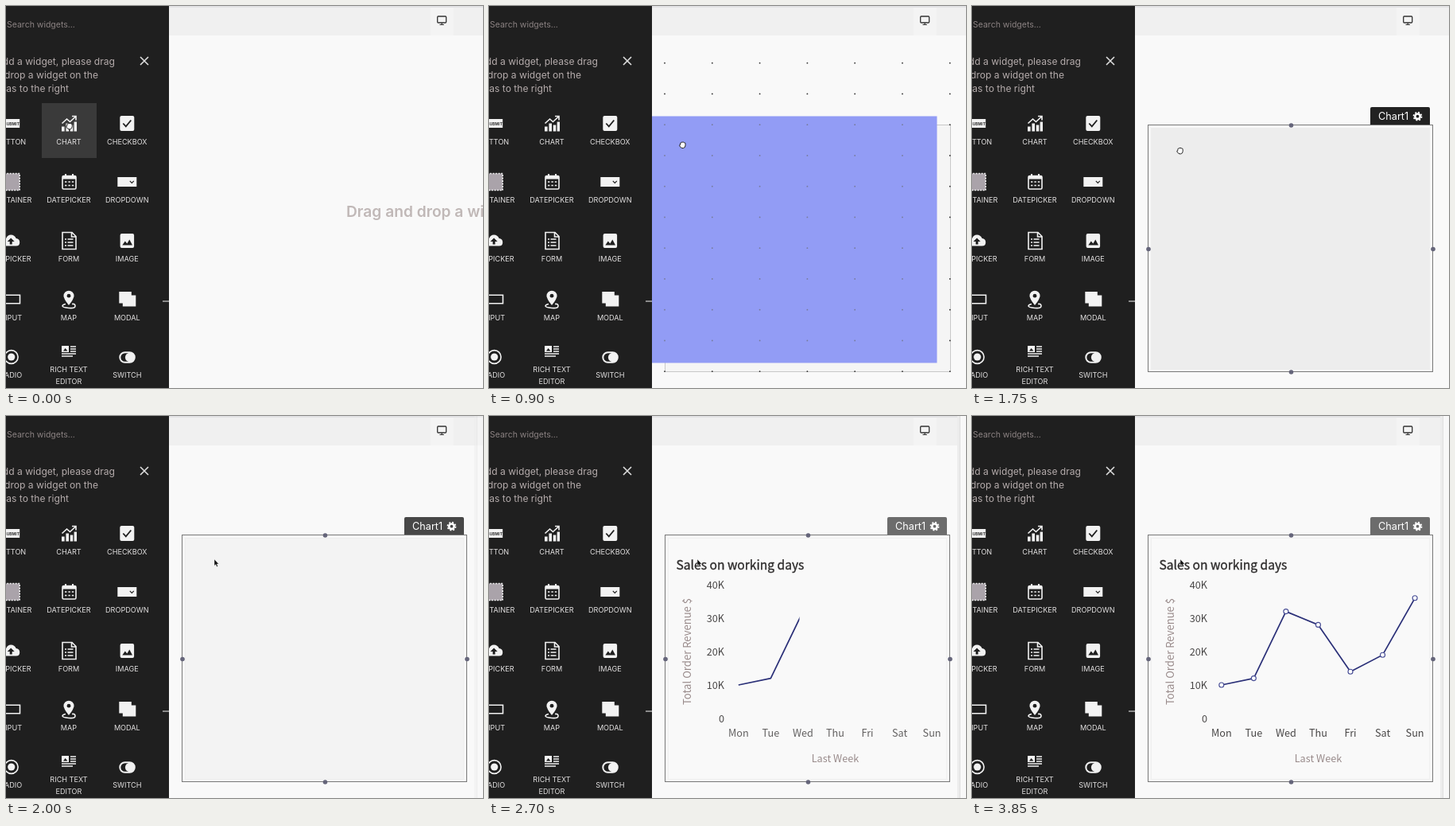
Animation, 600 px wide and 480 px high, one loop 5900 ms. Source, as an HTML page:

```html
<!DOCTYPE html>
<html lang="en">
<head>
<meta charset="utf-8">
<title>Adding a chart widget</title>
<style>
  html, body { margin: 0; width: 100%; height: 100%; overflow: hidden; background: #f9f9f9; }
  svg { display: block; }
  text { font-family: Inter, Roboto, sans-serif; white-space: pre; }
  #chart text { font-family: "Noto Sans CJK JP", "Noto Sans CJK SC", "Noto Sans CJK", "Noto Sans", sans-serif; font-size: 12.7px; fill: #494747; }
  #chart .title { font-size: 15.6px; fill: #2e2c2c; stroke: #2e2c2c; stroke-width: .35; }
  #chart .name { fill: #998b8b; }
  #chart .side { font-size: 13.1px; }
  .mid { text-anchor: middle; }
  .end { text-anchor: end; }
  .label { font-size: 9.1px; fill: #e2e0e0; text-anchor: middle; }
  .hint { font-size: 12.1px; fill: #b4abab; text-anchor: end; }
  .icon { fill: #f2f2f2; stroke: none; }
  .icon .line { fill: none; stroke: #f2f2f2; stroke-width: 1.6; }
  .icon .dark { fill: #1f1f1f; }
  .icon .cut { fill: none; stroke: #1f1f1f; stroke-width: 1.8; }
</style>
</head>
<body>
<svg width="600" height="480" viewBox="0 0 600 480">
  <defs><clipPath id="reveal"><rect id="wipe" x="308" y="200" width="0" height="200"/></clipPath></defs>
  <rect width="600" height="480" fill="#f9f9f9"/>
  <text id="prompt" x="428" y="265" font-size="19.2" font-weight="600" fill="#c0b8b7">Drag and drop a widget here</text>

  <g id="drag">
    <path id="bottom" d="M205 360.5H600" stroke="#bbb" stroke-dasharray="1 1"/>
    <rect id="slot" width="359" height="310" fill="#f5f5f5" stroke="#999" stroke-dasharray="1 1"/>
    <g id="dots" fill="#333"></g>
    <rect id="ghost" width="359" height="310" fill="#929cf5"/>
    <g id="faint" fill="#767b9b"></g>
  </g>

  <g id="widget">
    <rect x="221.5" y="149.5" width="358" height="310" fill="#f9f9f9" stroke="#777"/>
    <rect x="225.5" y="153.5" width="350" height="303" fill="none" stroke="#e6e6e6" stroke-dasharray="1 1"/>
    <rect id="skeleton" x="225" y="153" width="351" height="304" fill="#ededed"/>
    <g id="chart"></g>
    <g fill="#65657a">
      <circle cx="401.5" cy="150" r="2.8"/><circle cx="401.5" cy="460" r="2.8"/>
      <circle cx="222" cy="305.5" r="2.8"/><circle cx="580" cy="305.5" r="2.8"/>
    </g>
    <path id="tag" d="M501 149V129q0-2 2-2h71q2 0 2 2v20z"/>
    <text x="511" y="143.3" font-size="12.7" fill="#fff">Chart1</text>
    <circle cx="560.5" cy="138.7" r="3.2" fill="none" stroke="#fff" stroke-width="2.6"/>
    <circle cx="560.5" cy="138.7" r="5.1" fill="none" stroke="#fff" stroke-width="1.6" stroke-dasharray="2 2.005"/>
  </g>

  <rect x="205" width="395" height="37" fill="#f0f0f0"/>
  <rect x="205" width="395" height="2" fill="#e2e2e4"/>
  <rect x="534" y="2" width="29" height="35" fill="#f4f4f4"/>
  <rect x="542.7" y="13" width="11" height="8" rx="1" fill="none" stroke="#333" stroke-width="1.3"/>
  <path d="M548.2 21v2.5M545.5 23.5h5.4" stroke="#333" stroke-width="1.2"/>
  <g id="pane">
    <rect x="589" width="3" height="480" fill="#ececec"/>
    <rect x="592" width="8" height="480" fill="#f8f8f8"/>
    <path d="M592.5 0V480" stroke="#dedede"/>
  </g>

  <rect width="205" height="480" fill="#1f1f1f"/>
  <path d="M197 371h8" stroke="#bbb" stroke-width="1.4"/>
  <text x="1" y="27" font-size="10.5" fill="#8b8282">Search widgets...</text>
  <text class="hint" x="137" y="74.3">To add a widget, please drag</text>
  <text class="hint" x="116" y="91.3">and drop a widget on the</text>
  <text class="hint" x="79" y="108.3">canvas to the right</text>
  <path d="M169 64l10 10M179 64l-10 10" stroke="#ddd" stroke-width="1.6"/>
  <rect id="hover" x="45" y="122" width="69" height="69" fill="#3a3a3a"/>
  <g id="menu"></g>

  <path id="hand" d="M-3.2 -1.6q0-1.6 1.4-1.4q.6-1.2 1.8-.5q1.2-.6 1.8.5q1.5-.2 1.4 1.4v2q0 3-2.6 3.4h-1.6q-1.6-.3-3-2.6q-.6-1.8.8-1.4z" fill="#fff" stroke="#222"/>
  <path id="arrow" d="M262 180v8.2l1.8-1.6 1.3 2.8 1.4-.7-1.3-2.7h2.4z" fill="#111" stroke="#fff" stroke-width=".4"/>
</svg>
<script>
const el = id => document.getElementById(id);
const cols = [6.2, 79, 152.3], rows = [147.5, 221, 295, 368.5, 441];

// label and icon, drawn around its own centre
const items = [
  ["BUTTON", '<path d="M-20-5.5h31v11h-31z"/><text x="1" y="2" font-size="5" font-weight="700" fill="#333" text-anchor="middle">SUBMIT</text>'],
  ["CHART", '<path d="M-9 4h3.6v6H-9zM-3.6 0H0v10h-3.6zM1.7 2h3.6v8H1.7zM6.6-2H10v12H6.6z"/><path class="line" d="M-8.5 0l6-5.5 4 3.5 7-6.5M4-9h5v5"/>'],
  ["CHECKBOX", '<rect x="-9" y="-9.5" width="18" height="19" rx="2"/><path class="cut" d="M-5 0l3.5 3.8L5-4"/>'],
  ["CONTAINER", '<rect x="-12" y="-10.5" width="23" height="21" fill="#aaa3aa"/><rect class="line" x="-12" y="-10.5" width="23" height="21" stroke-dasharray="2 1.5"/>'],
  ["DATEPICKER", '<rect class="line" x="-8" y="-7.5" width="17" height="16.5" rx="1.5"/><path d="M-8-7.5H9v4H-8zM-5-10h2v4h-2zM4-10h2v4H4z"/><path class="line" stroke-dasharray="2.4 2" d="M-5 0H7M-5 4.5H7"/>'],
  ["DROPDOWN", '<path d="M-12-6h24V6h-24z"/><path class="cut" style="stroke-width:1.2" d="M3.5-1.2L6 1.3 8.5-1.2"/>'],
  ["FILEPICKER", '<path d="M-8 6.5q-4-1-3.5-5T-6-3q1.5-4.5 6-4.5T6.5-3q4.5.5 4.5 5T6.5 6.5z"/><path class="dark" d="M0-3.5L4.5 1h-3v3.5h-3V1h-3z"/>'],
  ["FORM", '<path class="line" d="M-8-10.5H4L9-5.5V10.5H-8zM3.5-10.5V-5H9"/><path class="line" style="stroke-width:1.5" d="M-5-2h2m1.5 0h7M-5 2h2m1.5 0h7M-5 6h2m1.5 0h7"/>'],
  ["IMAGE", '<rect x="-8.7" y="-9" width="17.5" height="18" rx="2"/><path class="dark" d="M-6 5.5L-2.5.5 0 3.5 3-1.5 6.7 5.5z"/>'],
  ["INPUT", '<path class="line" d="M-20-5.2h31.3V5.2H-20z"/>'],
  ["MAP", '<path d="M0 7.5Q-6.5-.5-6.5-4.3A6.5 6.5 0 0 1 6.5-4.3Q6.5-.5 0 7.5z"/><circle class="dark" cx="0" cy="-4.3" r="2.4"/><path class="line" d="M-4 6q-4 .8-4 2.5t8 2.5 8-2.5T4 6"/>'],
  ["MODAL", '<path d="M-10-9.5H5.5V-5H11V9H-5.5V5H-10z"/>'],
  ["RADIO", '<circle class="line" cx=".5" cy="0" r="8.4"/><circle cx=".5" cy="0" r="4.6"/>'],
  ["RICH TEXT", '<path d="M-9-14H0v8h-9z"/><path class="dark" d="M-7-7.5l2.5-3.5 3 3.5z"/><path class="line" d="M2-13h7M2-10h7M2-7h7M-9-4H9M-9-1H5"/>'],
  ["SWITCH", '<rect class="line" style="stroke-width:2" x="-9" y="-5.8" width="18.5" height="12.6" rx="6.3"/><circle cx="3.4" cy=".5" r="5.8"/>']
];
el("menu").innerHTML = items.map(([name, art], i) => {
  const x = cols[i % 3], y = rows[Math.floor(i / 3)], rich = name === "RICH TEXT";
  return `<g class="icon" transform="translate(${x} ${y})">${art}</g>` +
    `<text class="label" x="${x}" y="${y + (rich ? 19 : 26.4)}">${name}</text>` +
    (rich ? `<text class="label" x="${x}" y="${y + 34.3}">EDITOR</text>` : "");
}).join("");

const sales = [10, 12, 32, 28, 14, 19, 36];
const days = ["Mon", "Tue", "Wed", "Thu", "Fri", "Sat", "Sun"];
const px = i => 313.8 + 40.55 * i, py = v => 380 - 4.2 * v;
const points = sales.map((v, i) => [px(i), py(v)]);
el("chart").innerHTML =
  `<text class="title" x="235.5" y="192.7">Sales on working days</text>
   <text class="name side mid" transform="translate(254 296) rotate(-90)">Total Order Revenue $</text>
   <text class="name mid" x="435.5" y="434.7">Last Week</text>` +
  [0, 10, 20, 30, 40].map(v => `<text class="end" x="296" y="${py(v) + 4.8}">${v ? v + "K" : 0}</text>`).join("") +
  `<g id="days">${days.map((d, i) => `<text class="mid" x="${px(i)}" y="403">${d}</text>`).join("")}</g>
   <polyline points="${points.join(" ")}" fill="none" stroke="#2b3078" stroke-width="1.7" stroke-linejoin="round" clip-path="url(#reveal)"/>
   <g id="anchors" fill="#fff" stroke="#444a93" stroke-width="1.1">${points.map(([x, y]) => `<circle cx="${x}" cy="${y}" r="3"/>`).join("")}</g>`;

const clamp = x => Math.min(1, Math.max(0, x));
const ramp = (t, a, b) => clamp((t - a) / (b - a));
const smooth = x => x * x * (3 - 2 * x);
const easeOut = x => 1 - (1 - x) ** 2;
const show = (id, on) => el(id).style.display = on ? "" : "none";
const set = (id, attrs) => { for (const k in attrs) el(id).setAttribute(k, attrs[k]); };

// keys are [time, x, y]
function along(keys, t) {
  let i = 0;
  while (i < keys.length - 2 && t > keys[i + 1][0]) i++;
  const [a, b] = [keys[i], keys[i + 1]], k = smooth(ramp(t, a[0], b[0]));
  return [a[1] + (b[1] - a[1]) * k, a[2] + (b[2] - a[2]) * k];
}
const handPath = [[50, 80, 151], [600, 232, 170], [1300, 262, 182]];
const ghostPath = [[50, 34, 112], [600, 186, 131], [1300, 233, 150]];
const slotPath = [[450, 161.5, 110.5], [620, 170.5, 146.5], [900, 221.5, 149.5]];

function grid(rowCount, inside) {
  let out = "";
  for (let j = 0; j < rowCount; j++)
    for (let i = 0; i < 7; i++) {
      const x = 221 + 59.8 * i, y = 71.7 + 38.75 * j;
      if (inside(x, y)) out += `<circle cx="${x}" cy="${y}" r=".9"/>`;
    }
  return out;
}

function draw(t) {
  const dragging = t >= 200 && t < 1650, over = t >= 450, dropped = t >= 1650;
  show("prompt", t < 200);
  show("hover", t < 150);
  show("drag", dragging);
  show("widget", dropped);
  show("hand", t < 2000);
  show("arrow", t >= 2000);
  const [hx, hy] = along(handPath, t);
  set("hand", { transform: `translate(${hx} ${hy})` });
  if (dragging) {
    const [x, y] = along(ghostPath, t), [sx, sy] = along(slotPath, t);
    const under = (a, b) => over && a >= x && a <= x + 359 && b >= y && b <= y + 310;
    const rowCount = t < 750 ? 8 : 11;
    show("ghost", over);
    show("slot", over);
    show("bottom", t < 750);
    set("ghost", { x, y });
    set("slot", { x: sx, y: sy });
    el("dots").innerHTML = grid(rowCount, (a, b) => !under(a, b));
    el("faint").innerHTML = grid(rowCount, under);
  }
  const grey = 34 + 74 * ramp(t, 1800, 2200);
  set("tag", { fill: `rgb(${grey},${grey},${grey})` });
  set("skeleton", { opacity: 1 - ramp(t, 1800, 2200) });
  set("pane", { opacity: ramp(t, 1850, 2200) });
  set("chart", { opacity: ramp(t, 2400, 2700) });
  set("days", { opacity: .85 + .15 * ramp(t, 3150, 3500) });
  set("wipe", { width: 5 + 246 * easeOut(ramp(t, 2550, 3420)) });
  set("anchors", { opacity: ramp(t, 3400, 3850) });
}

const start = performance.now();
function tick(now) {
  draw(Math.floor(Math.max(0, now - start) % 5900 / 50) * 50);
  requestAnimationFrame(tick);
}
draw(0);
requestAnimationFrame(tick);
</script>
</body>
</html>
```
